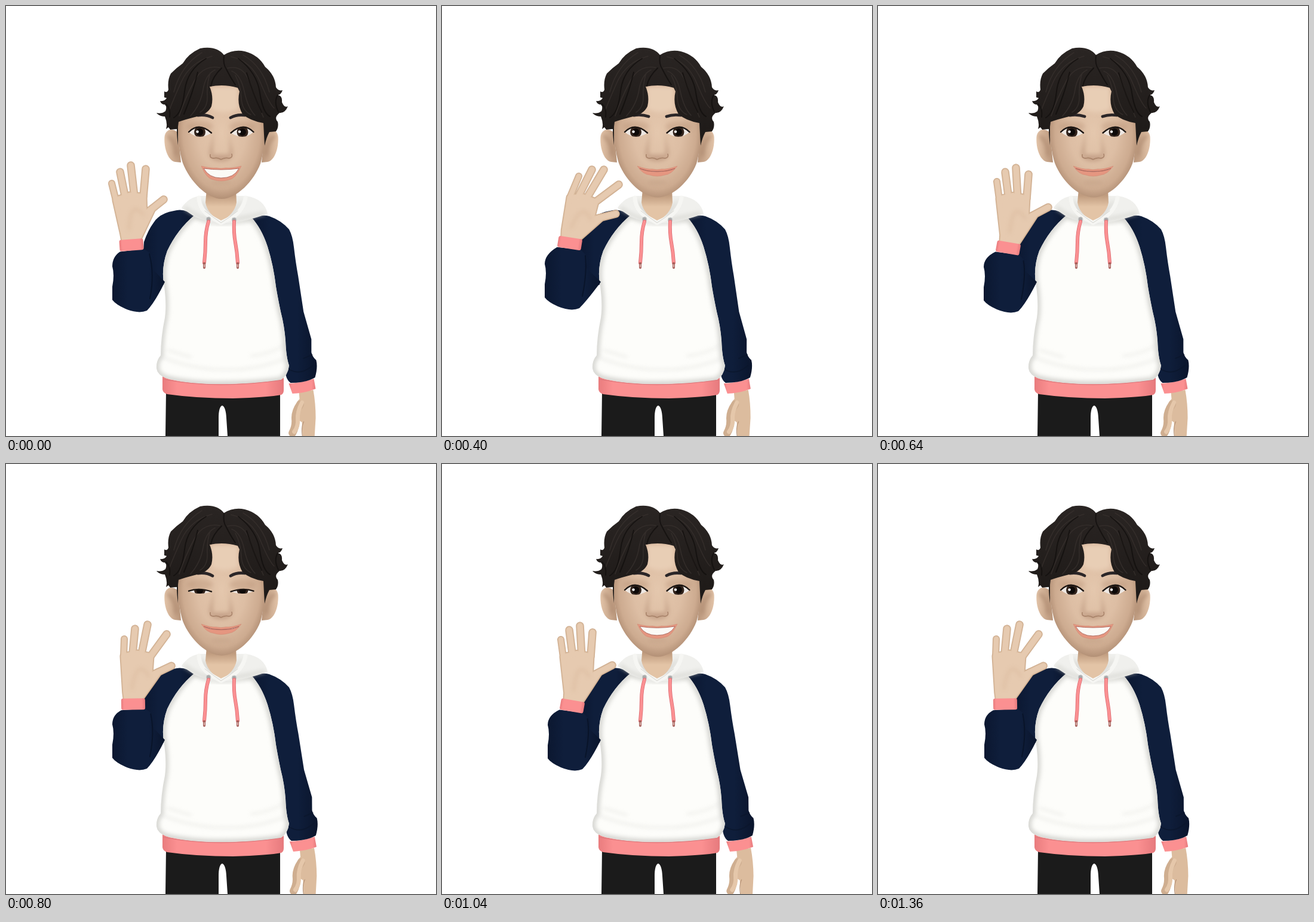
These frames come from a looping animation (720x720 px, 1.44 s). An HTML page:

```html
<!DOCTYPE html>
<html lang="en">
<head>
<meta charset="utf-8">
<title>Waving avatar</title>
<style>
  html, body { margin: 0; width: 100%; height: 100%; overflow: hidden; background: #fff; }
  svg { display: block; width: 100vw; height: 100vh; }
  .line { fill: none; stroke-linecap: round; stroke-linejoin: round; }
  .soft { filter: url(#blur); }
</style>
</head>
<body>
<svg viewBox="0 0 720 720">
  <defs>
    <filter id="blur" x="-50%" y="-50%" width="200%" height="200%"><feGaussianBlur stdDeviation="3.5"/></filter>
    <radialGradient id="skin" gradientUnits="userSpaceOnUse" cx="0" cy="0" r="118" gradientTransform="translate(361 212) scale(.68 1)">
      <stop offset="0" stop-color="#e4c7ad"/><stop offset=".5" stop-color="#ddbea4"/>
      <stop offset=".8" stop-color="#cdab90"/><stop offset="1" stop-color="#a8856b"/>
    </radialGradient>
    <linearGradient id="neck" x1="0" y1="0" x2="0" y2="1">
      <stop offset=".2" stop-color="#bf9b7e"/><stop offset=".55" stop-color="#e3c4a6"/>
    </linearGradient>
    <linearGradient id="ear">
      <stop offset="0" stop-color="#e2c3a8"/><stop offset="1" stop-color="#b8957a"/>
    </linearGradient>
    <linearGradient id="navy">
      <stop offset="0" stop-color="#0b1730"/><stop offset=".3" stop-color="#0f1e3b"/>
      <stop offset=".7" stop-color="#0f1e3b"/><stop offset="1" stop-color="#0a152c"/>
    </linearGradient>
    <linearGradient id="pink">
      <stop offset="0" stop-color="#e97c7e"/><stop offset=".12" stop-color="#fb9091"/>
      <stop offset=".85" stop-color="#fb9091"/><stop offset="1" stop-color="#e67a7d"/>
    </linearGradient>
    <linearGradient id="hairFill" x1="0" y1="0" x2="0" y2="1">
      <stop offset="0" stop-color="#2a2523"/><stop offset="1" stop-color="#1d1917"/>
    </linearGradient>
    <path id="torso" d="M316 350Q287 374 270 410Q259 440 265 470Q269 500 266 522Q259 555 259 585Q251 594 252 607Q254 620 274 625Q310 633 355 633Q415 633 460 626Q472 619 474 602Q469 588 468 560Q466 535 460 512Q455 488 452 470Q448 435 438 403Q428 372 410 353Z"/>
    <clipPath id="torsoClip"><use href="#torso"/></clipPath>
    <clipPath id="eyeClip"><path class="eye"/></clipPath>
    <g id="eyeShape">
      <path class="eye" fill="#eee8e3"/>
      <g clip-path="url(#eyeClip)">
        <circle cx="324.500" cy="211" r="9.500" fill="#33241c"/><circle cx="324.500" cy="211" r="6" fill="#0d0908"/>
      </g>
      <path class="lid line" stroke="#1b1512" stroke-width="2.400"/>
    </g>
    <path id="earShape" d="M288 212C278 203 267 207 265.500 219C264 237 271 259 283 261L293 262Z"/>
    <path id="cords" d="M339 361Q334 378 334 395T332 430M382 361Q381 380 384 396T388 430"/>
  </defs>

  <path d="M268 646L267 720H356V690Q356 671 362 669Q368 671 369 690L371 720H459V646Z" fill="#1b1b1b"/>

  <g id="sideArm">
    <path d="M490 646L514 643Q518 665 518 690L516 722H496L495 697L484 690Q482 665 491 658Z" fill="#dcbc9e"/>
    <path class="line" d="M492 667Q483 680 484 692T479 715" stroke="#cfae90" stroke-width="13"/>
    <path class="line" d="M495 664Q487 680 488 692T482 713" stroke="#e5c7aa" stroke-width="7"/>
    <path class="line soft" d="M505 654V718" stroke="#ebcfb3" stroke-width="8"/>
    <path class="line" d="M498 696Q493 706 496 722" stroke="#b18c70"/>
    <path d="M473 632Q495 631 515 624L518 641Q500 648 479 649Z" fill="url(#pink)"/>
    <path d="M410 356Q428 348 441 352Q461 359 474 374Q480 385 482 404Q485 430 489 452L498 512L511 558V580Q513 588 519 593Q522 605 517 622Q502 631 476 631Q466 624 467 602L455 560L440 480L420 380Z" fill="url(#navy)"/>
    <path class="line" d="M473 608Q493 620 513 602M498 590L512 584" stroke="#0a162c" stroke-width="2" opacity=".7"/>
  </g>

  <path d="M318 354Q300 337 281 343Q257 347 247 363Q238 375 231 395L228 440L240 480L268 464V420Z" fill="url(#navy)"/>

  <path d="M262 620V642Q263 648 270 650Q320 657 380 657Q440 655 461 651Q465 649 465 643V622Z" fill="url(#pink)"/>
  <use href="#torso" fill="#fdfdfa"/>
  <g clip-path="url(#torsoClip)">
    <use href="#torso" class="line soft" stroke="#d6d6d2" stroke-width="10"/>
    <g class="line soft" stroke="#d8d8d5" stroke-width="2" opacity=".7">
      <path d="M262 588Q310 608 365 609T469 590M270 576L310 588M467 568Q440 583 410 586"/>
    </g>
  </g>
  <path class="line" d="M264 625Q310 634 360 634T464 626" stroke="#d97679"/>

  <path class="line soft" d="M318 355Q340 364 360 364T410 359" stroke="#d2d2cd" stroke-width="4"/>
  <path d="M294 338Q307 319 326 318H340Q360 328 380 318H402Q433 323 438 348Q421 354 405 358Q379 365 360 362Q333 361 316 353Z" fill="#f0f0ed"/>
  <path class="line soft" d="M300 338Q318 352 338 357M432 347Q408 353 385 357" stroke="#d3d3ce" stroke-width="4"/>
  <path class="soft" d="M325 323Q330 345 356 360M397 322Q389 345 365 360" fill="#cfcfca"/>
  <path d="M336 306L334 329Q337 348 360 361Q383 348 386 329L385 306Z" fill="url(#neck)"/>
  <path class="line" d="M323 321Q324 342 344 354L360 363L379 354Q398 341 401 321" stroke="#f6f6f3" stroke-width="7"/>
  <path class="line" d="M333 343Q347 354 360 363Q375 354 388 343" stroke="#d5d5d0"/>
  <g class="line">
    <g fill="#a9a9a9" stroke="#d9d9d9"><circle cx="339" cy="357" r="4"/><circle cx="382" cy="358" r="4"/></g>
    <use href="#cords" stroke="#d96a70" stroke-width="6"/>
    <use href="#cords" stroke="#fb9092" stroke-width="4.500"/>
    <path d="M332 431V438M388 431V438" stroke="#a25b56" stroke-width="4"/>
    <path d="M332 433V437M388 433V437" stroke="#f0cfc9" stroke-width="1.500"/>
  </g>

  <use href="#earShape" fill="url(#ear)"/>
  <use href="#earShape" fill="url(#ear)" transform="translate(721) scale(-1 1)"/>
  <path class="line soft" d="M272 218Q285 228 285 250M449 218Q436 228 436 250" stroke="#a8846a" stroke-width="4"/>
  <path id="face" fill="url(#skin)"/>
  <path class="soft" d="M343 135H389V172Q366 184 344 172Z" fill="#e8ceb5"/>
  <g class="soft" fill="#a98268">
    <ellipse cx="325" cy="202" rx="22" ry="9" opacity=".3"/><ellipse cx="396" cy="202" rx="22" ry="9" opacity=".3"/>
    <path d="M349 205Q344 228 340 246Q342 260 360 260T380 246L372 205Q376 236 374 249H346Q346 230 349 205" opacity=".5"/>
    <ellipse cx="360" cy="295" rx="17" ry="3" opacity=".25"/>
  </g>
  <path class="line soft" d="M361 203V243" stroke="#f0d6bf" stroke-width="9" opacity=".65"/>
  <path class="line" d="M342 249Q341 255 348 255Q354 253 360 257Q367 253 373 255Q380 254 378 248" stroke="#a17a60" stroke-width="1.800" opacity=".75"/>

  <use href="#eyeShape"/>
  <use href="#eyeShape" transform="translate(720.500) scale(-1 1)"/>
  <g id="glints" fill="#fff"><circle cx="320.500" cy="210.500" r="2.200"/><circle cx="391" cy="210.500" r="2.200"/></g>
  <path id="brows" class="line" stroke="#2b2628" stroke-width="4.800"/>
  <path id="lips" fill="#e59680" stroke="#d08a75" stroke-width=".6"/>
  <path id="teeth" fill="#fbfaf6" stroke="#a9655a" stroke-width=".9"/>

  <path d="M288 233Q286 218 286 206L275 207L272 203L268 206Q271 197 266 185Q257 185 252 179Q261 181 267 176Q270 169 266 165Q260 165 258 159Q266 160 269 154L265 153V143Q270 146 272 140Q270 124 276 113Q286 103 296 96Q305 80 325 71Q352 66 365 82Q381 72 400 76Q423 82 434 102Q451 116 452 136Q456 143 463 141Q461 148 455 149Q463 150 462 161Q466 171 472 168Q467 180 458 179Q448 187 455 194Q457 203 452 210L441 211Q436 220 433 234L431 196Q408 192 396 181Q386 164 391 143L388 137Q365 130 341 135Q348 152 344 168Q338 181 320 185Q300 190 289 194L288 202Z" fill="url(#hairFill)"/>
  <g class="line" stroke="#39322f" stroke-width="1.600" opacity=".7">
    <path d="M358 103Q330 98 315 126T290 184M350 107Q334 115 330 140T309 184M342 112Q336 130 337 150T325 178M345 84Q308 94 293 128T274 173M328 78Q293 99 281 144"/>
    <path d="M371 104Q397 98 407 126T431 186M378 109Q393 115 399 143T417 183M384 116Q393 133 394 154T410 182M377 85Q411 92 426 128T449 171M397 82Q430 101 441 144"/>
  </g>
  <g class="line" stroke="#100d0c" stroke-width="2" opacity=".7">
    <path d="M365 83Q363 97 369 106Q376 120 384 132M361 104Q346 118 343 134M335 88Q303 107 299 143T281 187M321 111Q313 145 298 181M389 88Q420 111 425 145T442 185M403 112Q413 146 428 178M268 164Q276 171 274 186M455 149Q448 161 456 177"/>
  </g>

  <path id="sleeve" fill="url(#navy)"/>
  <path id="crease" class="line" stroke="#071123" stroke-width="2" opacity=".7"/>
  <g id="hand" class="line"></g>
  <rect id="cuff" x="-20" y="-9.500" width="40" height="19" rx="3" fill="url(#pink)"/>
</svg>

<script>
const STEP = 80, STEPS = 18;
const $ = id => document.getElementById(id);
const setPath = (id, d) => $(id).setAttribute('d', d);
const mix = (a, b, k) => a.map((v, i) => v + (b[i] - v) * k);
const at = p => p.map(v => v.toFixed(1)).join(' ');

// fingertips (little to thumb), little and index knuckles, cuff centre, cuff angle, elbow shift
const poses = {
  left:   [177,297, 191,278, 209,267, 234,273, 264,324, 184,325, 230,319, 210,400, -4, 0, 0],
  right:  [213,296, 231,282, 246,274, 265,284, 295,344, 216,324, 263,325, 223,403, 14, 0, 0],
  spread: [229,285, 251,274, 271,274, 296,299, 291,348, 214,321, 257,328, 214,397, 9, -6, -4],
  inward: [199,294, 213,278, 231,271, 252,282, 285,337, 203,323, 249,322, 218,405, 10, -1, 1],
  outer:  [169,301, 183,277, 204,266, 225,268, 251,314, 176,326, 221,315, 214,400, -9, 7, -2],
  back:   [198,293, 216,276, 237,269, 269,285, 277,338, 197,322, 242,322, 213,402, -1, 0, 0]
};
const { left, right, spread, inward, outer, back } = poses;
const settle = mix(right, spread, .5);
const wave = [
  left, mix(inward, outer, .95), inward, right, settle, spread, back, mix(inward, outer, .95), inward,
  right, back, outer, mix(inward, outer, 1.35), inward, right, settle, spread, back
];
const smile = [1, .7, .25, 0, 0, 0, 0, 0, 0, 0, .05, .2, .6, .9, 1, 1, 1, 1];
const blink = { 10: .55, 11: 1, 12: .5 };

function drawArm(p) {
  const point = i => [p[2 * i], p[2 * i + 1]];
  const [little, index, cuff] = [point(5), point(6), point(7)];
  const [angle, ex, ey] = p.slice(16);
  const c = Math.cos(angle * Math.PI / 180), s = Math.sin(angle * Math.PI / 180);
  const local = (x, y) => [cuff[0] + x * c - y * s, cuff[1] + x * s + y * c];
  const knuckle = k => {
    const [x, y] = mix(little, index, k);
    return [x, y - 5 * Math.sin(k * Math.PI)];
  };
  const thumbRoot = mix(local(0, -14), index, .37);
  const [web, thumbJoint] = [.3, .6].map(k => mix(thumbRoot, point(4), k));
  const fingers = [0, 1, 2, 3].map(i => [knuckle(i / 3), point(i), i ? 13.5 : 12]);
  fingers.push([thumbRoot, point(4), 13.5]);
  const palm = [little, knuckle(.5), index, web, thumbJoint, local(12, -10), local(10, -2), local(-10, -2), local(-12, -20)];

  $('hand').innerHTML = [['#ccaa8c', 0], ['#dcbea1', 2], ['#e6cab0', 4.5]].map(([color, inset]) =>
    `<path d="M${palm.map(at).join('L')}Z" fill="${color}" stroke="${color}" stroke-width="${13 - inset}"/>` +
    fingers.map(([a, b, w]) =>
      `<path d="M${at(a)}L${at(b)}" stroke="${color}" stroke-width="${w - inset}"/>`).join('')
  ).join('') + `<path class="soft" d="M${at(web)}Q${at(mix(little, index, .5))} ${at(local(-2, -25))}" stroke="#c39c7d" stroke-width="2" opacity=".5"/>`;
  $('cuff').setAttribute('transform', `translate(${at(cuff)}) rotate(${angle})`);

  const arm = (x, y) => at([x + ex, y + ey]);
  setPath('sleeve', `M${at(local(-20, 10))}Q${arm(178, 420)} ${arm(178, 436)}Q${arm(182, 450)} ${arm(178, 470)}` +
    `L${arm(178, 492)}Q${arm(184, 500)} ${arm(200, 507)}Q${arm(222, 516)} ${arm(236, 510)}` +
    `Q${arm(249, 497)} 266 462L${arm(247, 442)}Q${at(local(36, 22))} ${at(local(29, 15))}L${at(local(20, 8))}Z`);
  setPath('crease', `M${at(local(29, 17))}Q${arm(249, 450)} ${arm(241, 490)}`);
}

function drawFace(open, shut) {
  const chin = 320.5 + 2.5 * open;
  setPath('face', `M287 185Q287 235 296 263C308 294 337 ${chin} 361 ${chin}C386 ${chin} 415 293 426 264Q434 237 435 185L397 120H337Z`);
  const lip = 287 + 8 * open, upper = 273 - 2 * open;
  setPath('lips', `M327 268Q343 ${upper + 1} 352 ${upper}Q360 ${upper + 2} 368 ${upper}Q378 ${upper + 1} 394 268Q384 ${lip - 5} 373 ${lip - 4}Q360 ${lip} 348 ${lip - 4}Q336 ${lip - 5} 327 268Z`);
  const bite = 283 - 7 * open, tooth = 277 + 11 * open;
  setPath('teeth', `M331 272Q360 ${bite} 390 272Q382 ${tooth} 360 ${tooth}Q340 ${tooth} 331 272Z`);

  const outerY = 211 + 3 * shut, innerY = 212.5 + 2 * shut;
  const lid = `M306 ${outerY}Q323 ${194 + 23 * shut} 344 ${innerY}`;
  document.querySelectorAll('.lid').forEach(e => e.setAttribute('d', lid));
  document.querySelectorAll('.eye').forEach(e => e.setAttribute('d', `${lid}Q323 ${226 - 9 * shut} 306 ${outerY}Z`));
  $('glints').setAttribute('opacity', shut > .5 ? 0 : 1);
  const inner = 185 + 2 * open + 4 * shut;
  setPath('brows', `M321 183Q335 181 346 ${inner}M400 183Q387 181 376 ${inner}`);
}

function tick() {
  const step = Math.floor(performance.now() / STEP) % STEPS;
  drawArm(wave[step]);
  drawFace(smile[step], blink[step] || 0);
  const sway = .8 + 2 * Math.cos(2 * Math.PI * (step - 13) / STEPS);
  $('sideArm').setAttribute('transform', `translate(440 370) skewX(${(sway * .23).toFixed(2)}) translate(-440 -370)`);
  requestAnimationFrame(tick);
}
tick();
</script>
</body>
</html>
```
